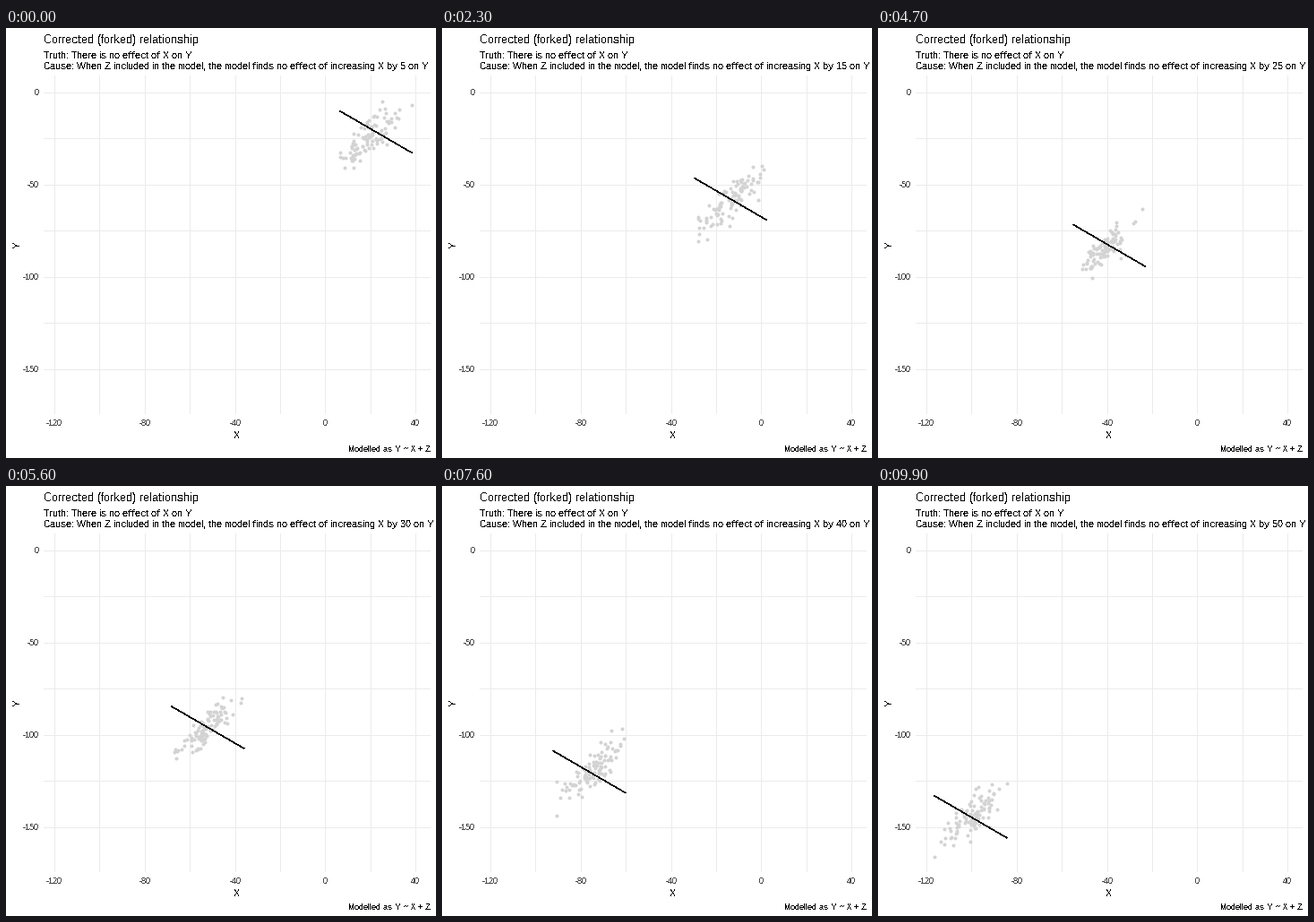
A matplotlib script for the animation above (10000 ms loop, 480x480 px).

```python
import numpy as np
import matplotlib.pyplot as plt
from matplotlib.animation import FuncAnimation

SIZE = 480
FRAMES = 100
STEP = 11        # frames from one state to the next
POINTS = 100
HALF = 16        # half the X range of a cloud
OFFSET = -44.1   # Y - X at the middle of a cloud
SLOPE = -0.71    # slope of the fitted line

# Middle of the X range in each state
MIDS = np.array([22.5, 3.8, -12.5, -26.2, -34.5,
                 -51, -62, -77.5, -88, -100.4])

LEFT, RIGHT, TOP, BOTTOM = 42, 474, 53, 431   # panel, in pixels
X0, Y0, SX, SY = 356.4, 71.6, 2.52, 2.06      # pixel of (0, 0) and scales
GREY = "#4D4D4D"

plt.rcParams.update({
    "font.family": "Liberation Sans",
    "text.hinting": "native",
    "text.hinting_factor": 1,
    "text.antialiased": False,
    "lines.antialiased": False,
})

rng = np.random.default_rng(5)


def cloud(mid):
    """Rising scatter that spans mid - HALF to mid + HALF."""
    u, e = rng.standard_normal((2, POINTS))
    u = 2 * (u - u.min()) / np.ptp(u) - 1
    return np.column_stack([mid + HALF * u, mid + OFFSET + 16.5 * u + 5 * e])


CLOUDS = [cloud(m) for m in MIDS]


def label(x, y, s, size, color="black", **kw):
    return fig.text(x / SIZE, 1 - y / SIZE, s, fontsize=size, color=color, **kw)


fig = plt.figure(figsize=(SIZE / 72, SIZE / 72), dpi=72, facecolor="white")
ax = fig.add_axes([LEFT / SIZE, 1 - BOTTOM / SIZE,
                   (RIGHT - LEFT) / SIZE, (BOTTOM - TOP) / SIZE])
ax.set_xlim((LEFT - X0) / SX, (RIGHT - X0) / SX)
ax.set_ylim((Y0 - BOTTOM) / SY, (Y0 - TOP) / SY)
ax.axis("off")

for x in range(-120, 41, 20):
    ax.axvline(x, color="#EBEBEB", lw=1, zorder=1)
for y in range(-150, 1, 25):
    ax.axhline(y, color="#EBEBEB", lw=1, zorder=1)

for x in range(-120, 41, 40):
    label(X0 + SX * x, 444, str(x), 9, GREY, ha="center")
for y in range(-150, 1, 50):
    label(37, Y0 + 3.4 - SY * y, str(y), 9, GREY, ha="right")

label(42, 17, "Corrected (forked) relationship", 13)
label(42, 34, "Truth: There is no effect of X on Y", 11)
cause = label(42, 46, "", 11)
label(257.5, 458, "X", 11, ha="center")
label(18, 241.5, "Y", 11, rotation=90, va="center", ha="right")
label(474, 473, "Modelled as Y ~ X + Z", 9, ha="right")

dots, = ax.plot([], [], "o", ms=4, mew=0, color="#D3D3D3", zorder=2)
fit, = ax.plot([], [], color="black", lw=0.5, zorder=3)


def between(states, pos):
    i = min(int(pos), len(states) - 2)
    return states[i] + (states[i + 1] - states[i]) * (pos - i)


def draw(frame):
    pos = frame / STEP
    dots.set_data(*between(CLOUDS, pos).T)
    mid = between(MIDS, pos)
    dx = np.array([-HALF, HALF])
    fit.set_data(mid + dx, mid + OFFSET + SLOPE * dx)
    shift = 5 * (round(pos) + 1)
    cause.set_text("Cause: When Z included in the model, the model finds "
                   f"no effect of increasing X by {shift} on Y")
    return dots, fit, cause


anim = FuncAnimation(fig, draw, frames=FRAMES, interval=100, repeat=True)
plt.show()
```
